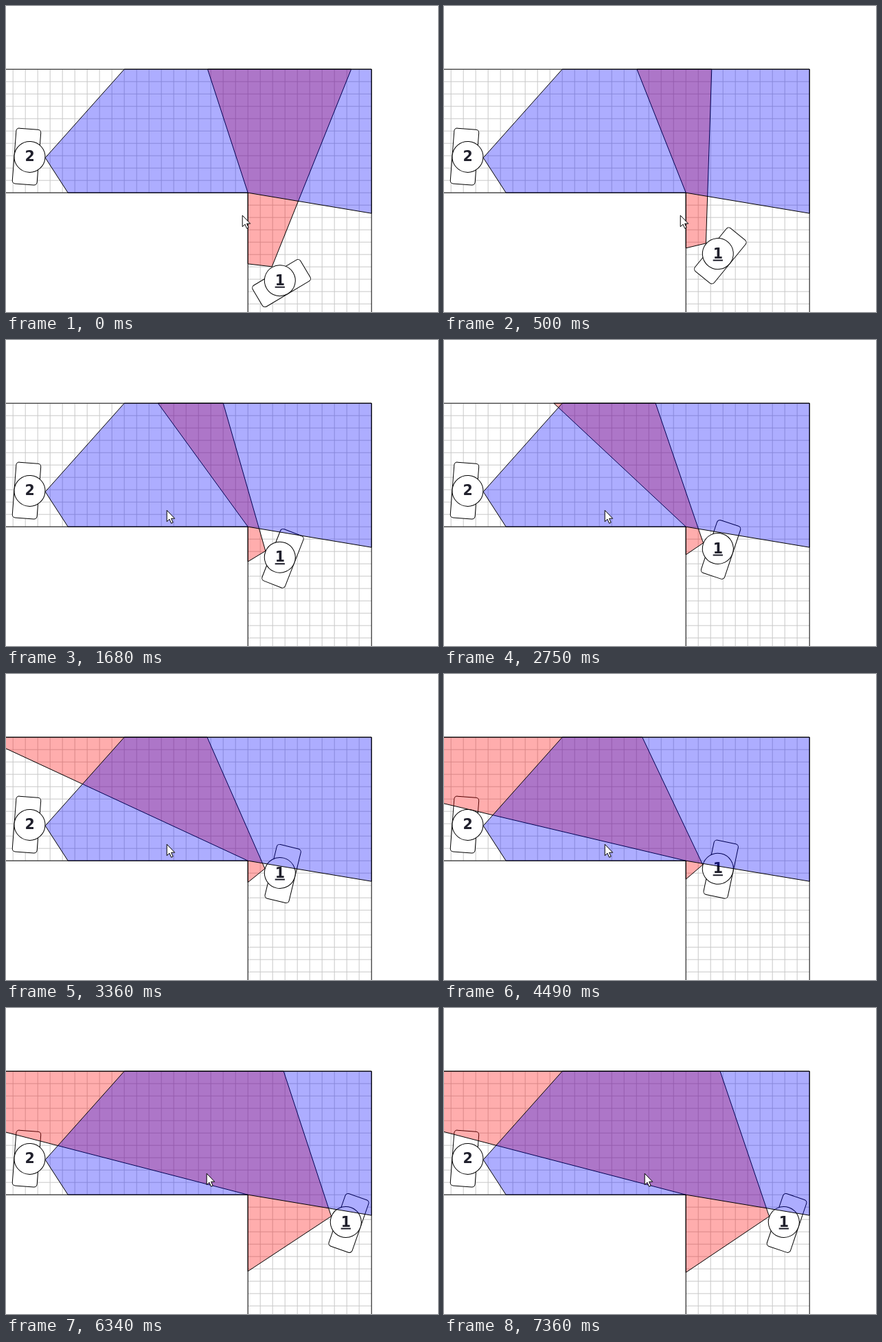
An HTML page for the animation above (8 s loop, 629 by 446 pixels).

```html
<!DOCTYPE html>
<html lang="en">
<head>
<meta charset="utf-8">
<title>Fields of view</title>
<style>
html, body { margin: 0; width: 100%; height: 100%; overflow: hidden; background: #fff; }
svg { display: block; }
.line { stroke: #000; stroke-width: 1; }
.grid { stroke: #c8c8c8; fill: none; }
.wall { fill: none; }
.body { fill: #fff; }
.cone { stroke-linejoin: round; fill-opacity: .32; }
text { font: bold 20.5px "DejaVu Sans", sans-serif; text-anchor: middle; fill: #20202c; }
</style>
</head>
<body>
<svg width="629" height="446" viewBox="0 0 629 446">
  <defs>
    <clipPath id="room"><path d="M-9 92H532V460H352V272H-9Z"/></clipPath>
    <g id="body" class="line body">
      <rect x="-22.5" y="-40.5" width="36" height="81" rx="4.5"/>
      <circle r="22.5"/>
    </g>
  </defs>
  <g transform="translate(.2 .2)">
    <path id="grid" class="grid" clip-path="url(#room)"/>
    <path class="line wall" d="M-9 92H532V460M352 460V272H-9"/>
    <g transform="translate(34.3 219.7)">
      <use href="#body" transform="rotate(4.4)"/>
      <text y="6.5">2</text>
    </g>
    <g id="player">
      <use id="turn" href="#body"/>
      <text y="6.5" text-decoration="underline">1</text>
    </g>
    <path id="red" class="line cone" fill="#f00"/>
    <path id="blue" class="line cone" fill="#00f" d="M57 221L172 92H532V302L352 272H90Z"/>
    <path id="cursor" class="line" fill="#fff" d="M0 0V16.5L3.8 13L6.4 19L9 17.8L6.4 12H11.5Z"/>
  </g>
</svg>
<script>
const LOOP = 8000, STEP = 70, HALF_FOV = 52.65;
const TOP = 92, FLOOR = 272, WALL = 352, RIGHT = 532, CELL = 18, FAR = -700;
const LANES = [398.6, 494.6], LANE_CHANGE = 5100;
const $ = id => document.getElementById(id);
const rad = deg => deg * Math.PI / 180;

// Each move: start time, number of steps, values reached
const DRIVE = {            // y, facing angle
  from: [400, -120.8],
  moves: [
    [80, 12, 333, -155],
    [910, 2, 324.3, -162.2],
    [1050, 10, 316.5, -158.6],
    [2080, 3, 307, -160.2],
    [2750, 3, 297.4, -164],
    [3290, 3, 286, -167.5],
    [4490, 4, 276, -169.5],
    [LANE_CHANGE, 1, 356.4, -150.5],
    [5240, 10, 322, -158.5],
    [6200, 3, 311.8, -160.8],
    [7150, 4, 311.8, -161.3]
  ]
};
const POINTER = {          // x, y
  from: [344, 305],
  moves: [
    [910, 2, 341, 305],
    [1050, 10, 234, 248],
    [LANE_CHANGE, 1, 305, 248],
    [5240, 10, 292, 241]
  ]
};

function valuesAt({ from, moves }, t) {
  let values = from;
  for (const [start, steps, ...end] of moves) {
    if (t < start) break;
    const p = Math.min(1, (Math.floor((t - start) / STEP) + 1) / steps);
    values = values.map((v, i) => v + (end[i] - v) * p);
  }
  return values;
}

// Area seen from the eye, cut by the corner where floor and wall meet
function viewPath(x, y, angle) {
  const ex = x + 22.5 * Math.cos(rad(angle));
  const ey = y + 22.5 * Math.sin(rad(angle)) - 1;
  const left = ey + (WALL - ex) * Math.tan(rad(angle - HALF_FOV));
  const right = ex + (TOP - ey) / Math.tan(rad(angle + HALF_FOV));
  const slope = Math.max(0, (ey - FLOOR) / (ex - WALL));
  const farY = FLOOR - slope * (WALL - FAR);
  const shadow = farY > TOP
    ? [[FAR, farY], [FAR, TOP]]
    : [[WALL - (FLOOR - TOP) / slope, TOP]];
  const points = [[ex, ey], [WALL, left], [WALL, FLOOR], ...shadow, [right, TOP]];
  return "M" + points.map(p => p.map(v => v.toFixed(2)).join(" ")).join("L") + "Z";
}

function drawGrid() {
  let d = "";
  for (let x = RIGHT - CELL; x > 0; x -= CELL) d += `M${x} ${TOP}V460`;
  for (let y = TOP + CELL; y < 460; y += CELL) d += `M-9 ${y}H${RIGHT}`;
  $("grid").setAttribute("d", d);
}

function render(t) {
  const x = LANES[t < LANE_CHANGE ? 0 : 1];
  const [y, angle] = valuesAt(DRIVE, t);
  $("player").setAttribute("transform", `translate(${x} ${y})`);
  $("turn").setAttribute("transform", `rotate(${angle})`);
  $("red").setAttribute("d", viewPath(x, y, angle));
  $("cursor").setAttribute("transform", `translate(${valuesAt(POINTER, t)})`);
}

function tick() {
  render(performance.now() % LOOP);
  requestAnimationFrame(tick);
}

drawGrid();
tick();
</script>
</body>
</html>
```
